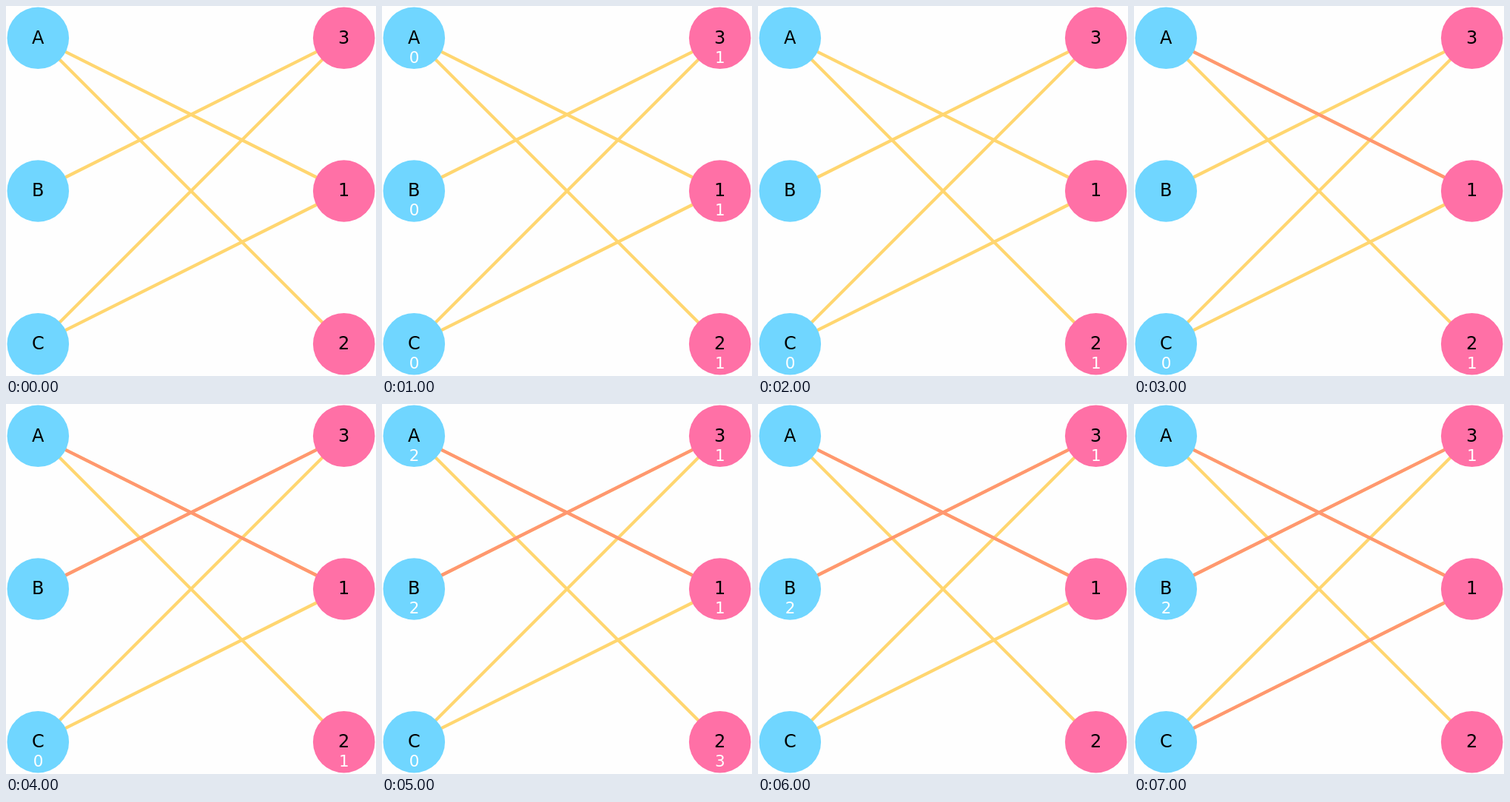
Write an HTML page that moves like this. It is 500x500 px and loops after 8000 ms.

```html
<!DOCTYPE html>
<html lang="en">
<head>
<meta charset="utf-8">
<title>Bipartite matching</title>
<style>
html, body { margin: 0; width: 100%; height: 100%; overflow: hidden; background: #fefefe; }
svg { display: block; width: 100vw; height: 100vh; }
text { font-family: "DejaVu Sans", sans-serif; text-anchor: middle; }
.edge { stroke: #ffd670; stroke-width: 4.2; }
.matched { stroke: #ff9770; }
.left { fill: #70d6ff; }
.right { fill: #ff70a6; }
.name { font-size: 24px; fill: #000; }
.level { font-size: 21.5px; fill: #fff; }

/* Each sNN is visible from second N to second N of the 8 s loop. */
[class*="show"] { opacity: 0; animation: 8s step-end infinite; }
.show12 { animation-name: s12; }
.show15 { animation-name: s15; }
.show16 { animation-name: s16; }
.show56 { animation-name: s56; }
.show58 { animation-name: s58; }
.show38 { animation-name: s38; }
.show48 { animation-name: s48; }
.show78 { animation-name: s78; }
@keyframes s12 { 0%, 25% { opacity: 0 } 12.5% { opacity: 1 } }
@keyframes s15 { 0%, 62.5% { opacity: 0 } 12.5% { opacity: 1 } }
@keyframes s16 { 0%, 75% { opacity: 0 } 12.5% { opacity: 1 } }
@keyframes s56 { 0%, 75% { opacity: 0 } 62.5% { opacity: 1 } }
@keyframes s58 { 0% { opacity: 0 } 62.5%, 100% { opacity: 1 } }
@keyframes s38 { 0% { opacity: 0 } 37.5%, 100% { opacity: 1 } }
@keyframes s48 { 0% { opacity: 0 } 50%, 100% { opacity: 1 } }
@keyframes s78 { 0% { opacity: 0 } 87.5%, 100% { opacity: 1 } }
</style>
</head>
<body>
<svg id="stage" viewBox="0 0 500 500"></svg>
<script>
const stage = document.getElementById('stage');
const L = 43.3, R = 456.7;
const nodes = {
  A: [L, 43.3], B: [L, 250], C: [L, 456.7],
  3: [R, 43.3], 1: [R, 250], 2: [R, 456.7]
};

function add(tag, attrs, text = '') {
  const el = document.createElementNS('http://www.w3.org/2000/svg', tag);
  for (const key in attrs) el.setAttribute(key, attrs[key]);
  el.textContent = text;
  stage.append(el);
}

function edge(pair, cls = '') {
  const [[x1, y1], [x2, y2]] = [...pair].map(n => nodes[n]);
  add('line', { x1, y1, x2, y2, class: 'edge ' + cls });
}

function level(node, value, span) {
  const [x, y] = nodes[node];
  add('text', { x: x + .2, y: y + 33.4, class: 'level show' + span }, value);
}

['A1', 'A2', 'B3', 'C3', 'C1'].forEach(pair => edge(pair));
edge('A1', 'matched show38');
edge('B3', 'matched show48');
edge('C1', 'matched show78');

for (const [name, [cx, cy]] of Object.entries(nodes)) {
  add('circle', { cx, cy, r: 41.8, class: cx === L ? 'left' : 'right' });
  add('text', { x: cx, y: cy + 7.2, class: 'name' }, name);
}

// First search: every free left node is a root.
level('A', 0, 12);
level('B', 0, 12);
level('C', 0, 16);
level('3', 1, 12);
level('1', 1, 12);
level('2', 1, 15);

// Second search: only C is still free.
level('A', 2, 56);
level('B', 2, 58);
level('3', 1, 58);
level('1', 1, 56);
level('2', 3, 56);
</script>
</body>
</html>
```
